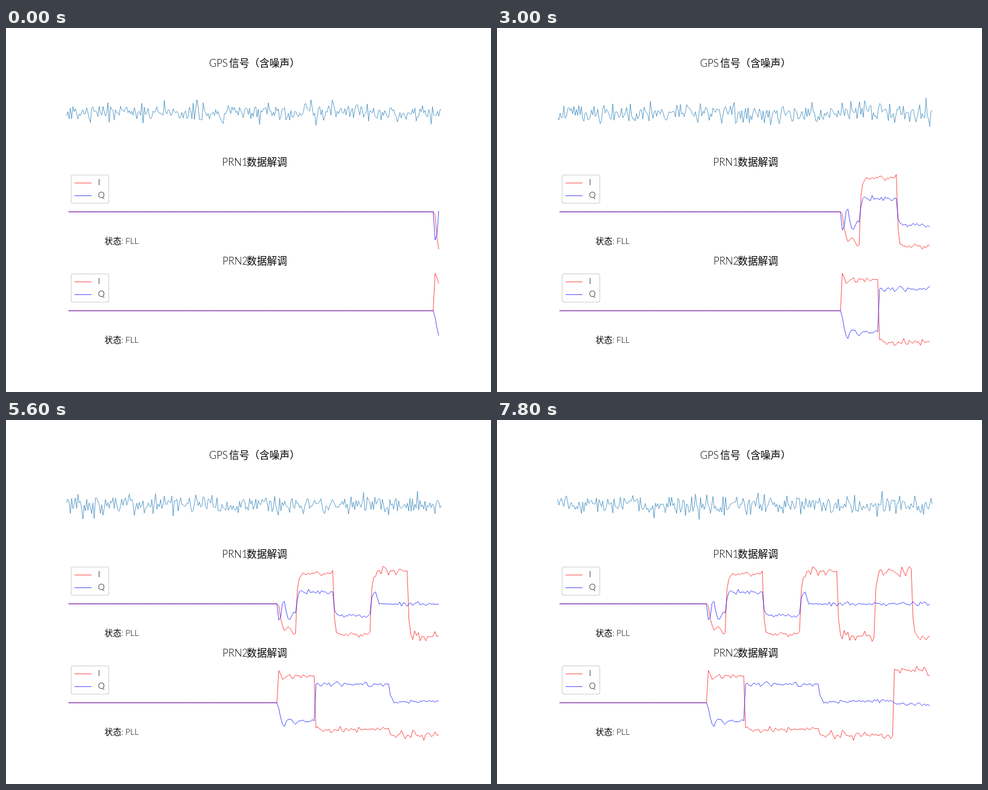
Animation of 800 by 600 pixels, one loop 8000 ms. Source, as an HTML page:

```html
<!DOCTYPE html>
<html lang="zh-CN">
<head>
<meta charset="utf-8">
<title>GPS信号解调</title>
<style>
  html, body { margin: 0; width: 100%; height: 100%; overflow: hidden; background: #fff; }
  svg { display: block; width: 800px; height: 600px; }
  text { font-family: Lato, "Noto Sans CJK SC", "Noto Sans CJK", sans-serif; font-weight: 300; font-size: 13.9px; fill: #000; }
  .title { font-size: 16.67px; }
  .trace { fill: none; stroke-width: .7; stroke-linejoin: round; }
  .box { fill: #fff; stroke: #d6d6d6; stroke-width: 1.3; }
</style>
</head>
<body>
<svg id="stage" viewBox="0 0 800 600"></svg>
<script>
const STEP_MS = 200, STEPS = 40, PER_STEP = 3, SLOTS = 200, HALF = 61.8;
const SAMPLES = STEPS * PER_STEP;
const stage = document.getElementById("stage");

function add(tag, attrs, text) {
  const node = document.createElementNS("http://www.w3.org/2000/svg", tag);
  for (const key in attrs) node.setAttribute(key, attrs[key]);
  if (text) node.textContent = text;
  return stage.appendChild(node);
}

function random(seed) {
  return () => {
    seed = (seed + 0x6D2B79F5) | 0;
    let v = Math.imul(seed ^ (seed >>> 15), 1 | seed);
    v = (v + Math.imul(v ^ (v >>> 7), 61 | v)) ^ v;
    return ((v ^ (v >>> 14)) >>> 0) / 4294967296;
  };
}

// A data bit seen at a phase error that rings at first and vanishes once the loop locks.
function demodulate({ seed, bit, amp, sag, phase, kick, rest, lock, follow }) {
  const rnd = random(seed), i = [], q = [];
  const jitter = size => { const u = rnd() * 2 - 1; return u * Math.abs(u) * size; };
  let level = bit(0);
  for (let n = 0; n < SAMPLES; n++) {
    level += (bit(n) - level) * follow;
    const locked = n >= lock;
    const ringing = kick * Math.exp(-n * .26) * Math.cos(n * 2 * Math.PI / 5.6);
    const error = rest + (phase - rest) * (locked ? Math.exp((lock - n - 1) * 1.3) : 1) + ringing;
    const size = amp * level * (1 - sag * Math.exp(-n / 4));
    i.push(size * Math.cos(error) + jitter(locked ? 9 : 5.5) * Math.abs(size / amp));
    q.push(size * Math.sin(error) + jitter(4));
  }
  return { i, q };
}

const channels = [
  {
    name: "PRN1", titleX: 356.5, mid: 303, seed: 11, lock: 53,
    bit: n => Math.floor((n + 10) / 20) % 2 ? 1 : -1,
    amp: 54, sag: .5, phase: .38, kick: 1.08, rest: 0, follow: .75
  },
  {
    name: "PRN2", titleX: 357, mid: 466.06, seed: 21, lock: 60,
    bit: n => n >= 20 && n < 100 ? -1 : 1,
    amp: 51, sag: 0, phase: -.61, kick: .44, rest: -.04, follow: .96
  }
];

function title(latin, latinX, han, hanX, y) {
  add("text", { class: "title", x: latinX, y }, latin);
  add("text", { class: "title", x: hanX, y }, han);
}

function trace(color) {
  return add("polyline", { class: "trace", stroke: color });
}

title("GPS", 335, "信号（含噪声）", 368, 64);
const signal = trace("#1f77b4");

for (const c of channels) {
  const top = c.mid - 303;
  Object.assign(c, demodulate(c));
  title(c.name, c.titleX, "数据解调", 397, top + 227);
  c.lineI = trace("red");
  c.lineQ = trace("blue");
  add("rect", { class: "box", x: 107.5, y: top + 242.3, width: 62, height: 46.5, rx: 2.8 });
  [["I", "#ff4f4f", 255.5], ["Q", "#4f4fff", 276.5]].forEach(([label, color, lineY]) => {
    const y = Math.floor(top + lineY) + .5;
    add("path", { d: `M113 ${y}H141`, stroke: color });
    add("text", { x: 151.8, y: y + 3.8 }, label);
  });
  add("text", { x: 162.5, y: top + 356.3 }, "状态:");
  c.status = add("text", { x: 197, y: top + 356.3 });
}

function plot(line, count, x, y) {
  line.setAttribute("points", Array.from({ length: count }, (_, n) => `${x(n).toFixed(2)},${y(n).toFixed(2)}`).join(" "));
}

function draw(step) {
  const rnd = random(step * 977 + 5);
  plot(signal, 300, n => 100 + n * 620 / 300, () => 140 + (rnd() + rnd() + rnd() + rnd() - 2) * 14.5);

  const count = PER_STEP * (step + 1), blank = SLOTS - count;
  for (const c of channels) {
    const peak = Math.max(...[...c.i.slice(0, count), ...c.q.slice(0, count)].map(Math.abs));
    const show = (line, data) => plot(line, SLOTS,
      n => 100 + (n + 1) * 620 / 202,
      n => c.mid - (n < blank ? 0 : data[n - blank] * HALF / peak));
    show(c.lineI, c.i);
    show(c.lineQ, c.q);
    c.status.textContent = count < c.lock ? "FLL" : "PLL";
  }
}

let shown = -1;
const start = performance.now();
function tick() {
  const step = Math.floor((performance.now() - start) / STEP_MS) % STEPS;
  if (step !== shown) draw(shown = step);
  requestAnimationFrame(tick);
}
tick();
</script>
</body>
</html>
```
